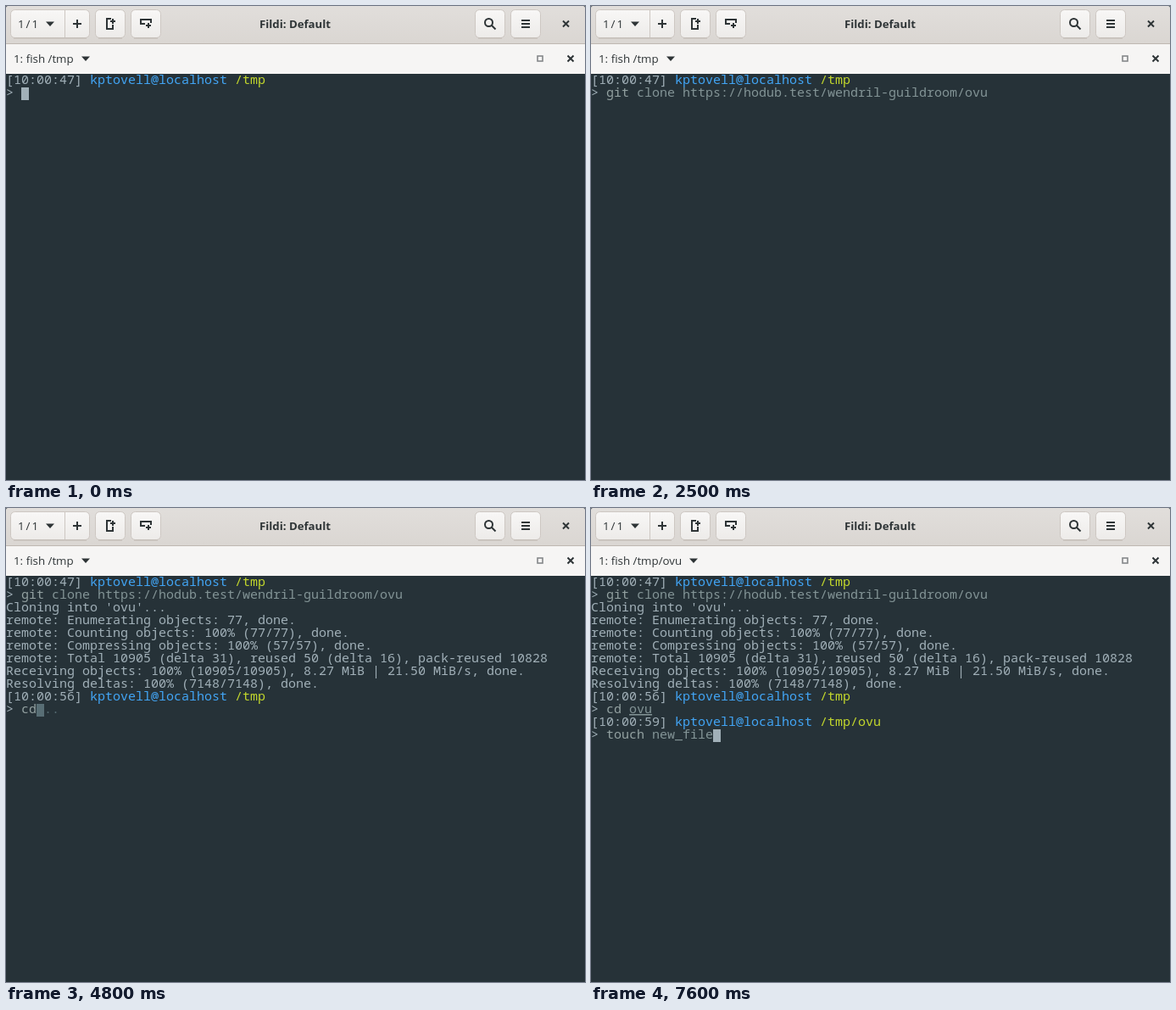
An HTML page for the animation above (8 s loop, 683 by 559 pixels).

```html
<!DOCTYPE html>
<html lang="en">
<head>
<meta charset="utf-8">
<title>Terminal session</title>
<style>
  html, body { margin: 0; width: 100%; height: 100%; overflow: hidden; background: #263238; }
  svg { display: block; }
  .ui { font: 13.33px "Open Sans", "Noto Sans", sans-serif; fill: #2e3436; }
  .title { font-weight: 700; font-size: 13.2px; text-anchor: middle; }
  .pages { letter-spacing: 2px; }
  .button { fill: url(#raised); stroke: #cdc7c2; }
  .icon { fill: none; stroke: #2e3436; stroke-width: 2; }
  .solid { fill: #2e3436; }
  #screen text { font: 15px "Noto Sans Mono", "DejaVu Sans Mono", monospace; white-space: pre; }
  .fg { fill: #a1b0b8; }
  .bg { fill: #263238; }
  .user { fill: #42a5f5; }
  .path { fill: #c3d82c; }
  .cmd { fill: #93a1a1; }
  .err { fill: #dc322f; }
  .arg { fill: #839496; }
  .dir { fill: #839496; text-decoration: underline; }
  .hint { fill: #586e75; }
</style>
</head>
<body>
<svg width="683" height="559" viewBox="0 0 683 559">
  <defs>
    <linearGradient id="bar" x2="0" y2="1">
      <stop stop-color="#e1dedb"/><stop offset="1" stop-color="#dad6d2"/>
    </linearGradient>
    <linearGradient id="raised" x2="0" y2="1">
      <stop stop-color="#f8f7f6"/><stop offset="1" stop-color="#edebe9"/>
    </linearGradient>
  </defs>

  <path d="M0 45V2Q0 0 2 0H681Q683 0 683 2V45Z" fill="url(#bar)"/>
  <path d="M0 44.5H683" stroke="#bfb8b1"/>
  <path d="M0 45H683V80H0Z" fill="#f6f5f4"/>

  <g class="button">
    <rect x="5.5" y="4.5" width="93" height="33" rx="5"/>
    <path d="M69.5 5V37"/>
    <rect x="105.5" y="4.5" width="35" height="33" rx="5"/>
    <rect x="147.5" y="4.5" width="35" height="33" rx="5"/>
    <rect x="553.5" y="4.5" width="35" height="33" rx="5"/>
    <rect x="595.5" y="4.5" width="35" height="33" rx="5"/>
  </g>
  <path d="M9 38H95M109 38H137M151 38H179M557 38H585M599 38H627" stroke="#bfb8b1"/>

  <g class="icon">
    <path d="M79 21H89M84 16V26"/>
    <path d="M124 15H119V27H126V22M123 18H129M126 15V21"/>
    <path d="M164 21H159V16H171V20M165 23H171M168 20V26"/>
    <circle cx="569.5" cy="19.5" r="4.5"/>
    <path d="M572.5 22.5L577.5 27.5"/>
    <path d="M608 17H618M608 21H618M608 25H618"/>
    <path d="M657 17.5L664 24.5M664 17.5L657 24.5"/>
    <path d="M662.5 58.5L669.5 65.5M669.5 58.5L662.5 65.5"/>
    <rect x="627" y="59" width="6" height="6" stroke="#85888a" stroke-width="1.6"/>
  </g>
  <path class="solid" d="M47 18.5H57L52 24Z"/>
  <path class="solid" id="caret" d="M-5 59.5H5L0 65Z"/>

  <g class="ui">
    <text class="pages" x="14" y="26">1/1</text>
    <text class="title" x="341" y="26">Fildi: Default</text>
    <text id="tab" x="9" y="67"></text>
  </g>
  <g id="screen"></g>
</svg>

<script>
const LOOP = 8000, CELL = 9, LINE = 15, TOP = 81, BASE = 92;
const repo = 'ovu';
const clone = `git clone https://hodub.test/wendril-guildroom/${repo}`;
const touch = 'touch new_file';

const plain = text => [[text, 'fg']];
const prompt = (time, dir) =>
  [[`[${time}] `, 'fg'], ['kptovell@localhost', 'user'], [` ${dir}`, 'path']];

function command(text, hint = '') {
  const [, word, gap, rest] = text.match(/^(\S*)(\s*)(.*)$/);
  const known = ['git', 'cd', 'touch'].includes(word);
  return [['> ', 'fg'], [word, known ? 'cmd' : 'err'], [gap, 'arg'],
          [rest, word === 'cd' ? 'dir' : 'arg'], [hint, 'hint']];
}

// Actions on the terminal state
const type = (full, count = full.length) => s => {
  s.rows[s.rows.length - 1] = command(full.slice(0, count), full.slice(count));
  s.col = 2 + count;
};
const blink = on => s => { s.on = on; };
const tab = (label, caret) => s => { s.tab = label; s.caret = caret; };
const print = (keep, ...lines) => s => {
  s.rows = [...s.rows.slice(0, keep), ...lines.map(l => typeof l === 'string' ? plain(l) : l)];
  s.col = 0;
};

const share = (n, total) => `${String(Math.floor(100 * n / total)).padStart(3)}% (${n}/${total})`;
const receive = n => `Receiving objects: ${share(n, 10905)}`;
const resolve = n => `Resolving deltas: ${share(n, 7148)}`;

const script = [
  [0, tab('1: fish /tmp', 94), print(0, prompt('10:00:47', '/tmp'), ''), type('')],
  [300, blink(false)],
  [600, blink(true)],
  [800, type('git status', 1)],
  [900, type('git status', 3)],
  [1200, type('git status', 4)],
  [1400, type(clone, 6)],
  [1600, type(clone, 8)],
  [1700, type(clone, 9)],
  [2300, type(clone)],
  [2500, blink(false)],
  [2700, blink(true)],
  [2900, tab('1: git /tmp', 87), print(2, `Cloning into '${repo}'...`, '')],
  [3100, print(3,
    'remote: Enumerating objects: 77, done.',
    'remote: Counting objects: 100% (77/77), done.',
    'remote: Compressing objects: 100% (57/57), done.',
    receive(1))],
  [3200, print(6, receive(2945))],
  [3300, print(6, receive(7416))],
  [3400, print(6,
    'remote: Total 10905 (delta 31), reused 50 (delta 16), pack-reused 10828',
    receive(10905) + ', 8.27 MiB | 21.50 MiB/s, done.',
    resolve(1502))],
  [3500, print(8, resolve(5433))],
  [3600, tab('1: fish /tmp', 94), blink(false),
    print(8, resolve(7148) + ', done.', prompt('10:00:56', '/tmp'), ''), type('')],
  [4000, blink(true)],
  [4800, type('cd ..', 2)],
  [4900, type('cd ..', 3)],
  [5500, type(`cd ${repo}`, 4)],
  [5600, type(`cd ${repo}`)],
  [6200, tab(`1: fish /tmp/${repo}`, 121),
    print(11, prompt('10:00:59', `/tmp/${repo}`), ''), type('')],
  [6800, type(touch, 1)],
  [6900, type(touch, 3)],
  [7100, type(touch, 6)],
  [7300, type(touch, 8)],
  [7400, type(touch, 9)],
  [7600, type(touch)],
];

const byId = id => document.getElementById(id);
const screen = byId('screen');

function add(parent, name, attrs, text = '') {
  const el = document.createElementNS('http://www.w3.org/2000/svg', name);
  for (const key in attrs) el.setAttribute(key, attrs[key]);
  el.textContent = text;
  parent.append(el);
  return el;
}

function drawCursor(row, y, col) {
  const cells = row.flatMap(([text, kind]) => [...text].map(glyph => [glyph, kind]));
  const [glyph, kind] = cells[col] || ['', 'fg'];
  const x = col * CELL;
  add(screen, 'rect', { x, y: TOP + y * LINE, width: CELL, height: LINE, class: kind });
  add(screen, 'text', { x, y: BASE + y * LINE, class: 'bg' }, glyph);
}

function draw(steps) {
  const s = { rows: [], col: 0, on: true };
  for (const [, ...actions] of steps) actions.forEach(act => act(s));
  byId('tab').textContent = s.tab;
  byId('caret').setAttribute('transform', `translate(${s.caret})`);
  screen.replaceChildren();
  s.rows.forEach((row, i) => {
    const line = add(screen, 'text', { x: 0, y: BASE + i * LINE });
    for (const [text, kind] of row) if (text) add(line, 'tspan', { class: kind }, text);
  });
  const last = s.rows.length - 1;
  if (s.on) drawCursor(s.rows[last], last, s.col);
}

let shown = 0;
function tick() {
  const now = performance.now() % LOOP;
  const steps = script.filter(([at]) => at <= now);
  if (steps.length !== shown) draw(steps);
  shown = steps.length;
  requestAnimationFrame(tick);
}
tick();
</script>
</body>
</html>
```
